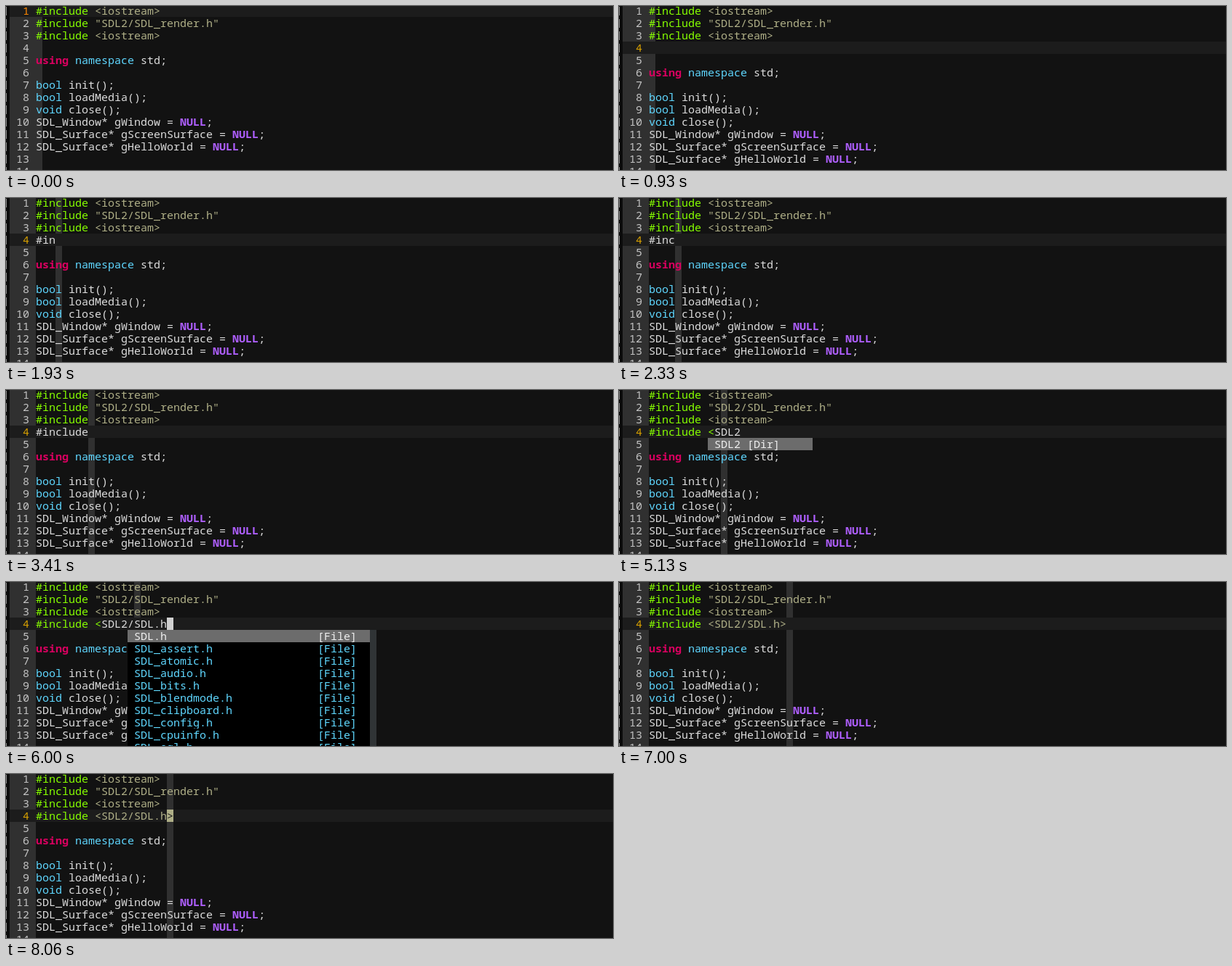
Write an HTML page with a canvas that moves like this. It is 834 px wide and 226 px high and loops after 8210 ms.

```html
<!DOCTYPE html>
<html lang="en">
<head>
<meta charset="utf-8">
<title>Editor completion</title>
<style>
  html, body { margin: 0; width: 100%; height: 100%; overflow: hidden; background: #121212; }
  canvas { display: block; }
</style>
</head>
<body>
<canvas id="screen" width="834" height="226"></canvas>
<script>
const LOOP = 8210;
const CELL = 9, LINE = 17, LEFT = 41, TOP = -2, GUTTER = 5, WIDTH = 834, ROWS = 14;
const C = {
  bg: '#121212', line: '#1c1c1c', column: '#303030', edge: '#0b0b0b', mark: '#8a8a8a',
  text: '#dcdcdc', number: '#c4c4c4', green: '#87ff00', tan: '#afaf87', cyan: '#5fd7ff',
  pink: '#d7005f', purple: '#af5fff', menu: '#000000', chosen: '#6c6c6c', bar: '#303436'
};

const ctx = document.getElementById('screen').getContext('2d');

const include = target => [['#include ', C.green], [target, C.tan]];
const declare = name => [[name + ' = ', C.text], ['NULL', C.purple, true], [';', C.text]];
const proto = (type, name) => [[type, C.cyan], [' ' + name + '();', C.text]];
const FILE = [
  include('<iostream>'),
  include('"SDL2/SDL_render.h"'),
  include('<iostream>'),
  [],
  [['using', C.pink, true], [' ', C.text], ['namespace', C.cyan], [' std;', C.text]],
  [],
  proto('bool', 'init'),
  proto('bool', 'loadMedia'),
  proto('void', 'close'),
  declare('SDL_Window* gWindow'),
  declare('SDL_Surface* gScreenSurface'),
  declare('SDL_Surface* gHelloWorld')
];

// Menus: first column, column of the kind label, width in cells, entries.
const entries = (names, kind) => names.split(' ').map(name => [name, kind]);
const headers = 'assert atomic audio bits blendmode clipboard config cpuinfo egl'
  .split(' ').map(name => `SDL_${name}.h`).join(' ');
const MENUS = {
  words: { col: 0, kind: 22, width: 29, bar: true,
    items: entries('include init inline int SDL_Window gWindow using iostream main incl', '[ID]') },
  std: { col: 9, kind: 29, width: 28, bar: true, items: [
    ['SDL2', '[Dir]'], ...entries('algorithm array atomic', '[File]'),
    ...entries('backward bits', '[Dir]'),
    ...entries('bitset cassert ccomplex cctype', '[File]')] },
  folder: { col: 9, kind: 15, width: 16, items: [['SDL2', '[Dir]']] },
  sdl: { col: 14, kind: 43, width: 37, bar: true, items: entries('SDL.h ' + headers, '[File]') }
};

// Each step overrides part of the editor state from its time on.
const STEPS = [
  [0, { row: 1, col: 0, opened: false, text: '', syntax: 'plain', menu: null, pick: -1, block: -1 }],
  [40, { row: 2 }],
  [600, { row: 3 }],
  [800, { row: 4, opened: true }],
  [1440, { text: '#' }],
  [1570, { col: 1 }],
  [1730, { text: '#i' }],
  [1830, { col: 2 }],
  [1930, { text: '#in', col: 3 }],
  [2130, { text: '#inc', menu: 'words' }],
  [2330, { col: 4, menu: null }],
  [2530, { text: '#incl', menu: 'words' }],
  [2590, { col: 5, menu: null }],
  [2660, { text: '#inclu', menu: 'words' }],
  [2720, { col: 6, menu: null }],
  [2920, { text: '#includ' }],
  [3060, { col: 7 }],
  [3260, { text: '#include' }],
  [3410, { col: 8 }],
  [3610, { text: '#include ' }],
  [3710, { col: 9 }],
  [3810, { text: '#include <' }],
  [4050, { syntax: 'open', col: 10 }],
  [4170, { menu: 'std' }],
  [4770, { text: '#include <S', col: 11, menu: null }],
  [4910, { menu: 'folder' }],
  [5130, { text: '#include <SDL2', pick: 0 }],
  [5320, { text: '#include <SDL2/', col: 15, menu: null, pick: -1 }],
  [5520, { menu: 'sdl' }],
  [6000, { text: '#include <SDL2/SDL.h', pick: 0, block: 20 }],
  [7000, { text: '#include <SDL2/SDL.h>', syntax: 'closed', col: 21, menu: null, pick: -1, block: -1 }],
  [7300, { block: 20 }],
  [7440, { block: 21 }],
  [7930, { block: 20 }],
  [8000, { col: 20 }]
];

const stateAt = time => Object.assign({}, ...STEPS.filter(([at]) => at <= time).map(step => step[1]));
const xOf = col => LEFT + col * CELL;
const yOf = row => TOP + (row - 1) * LINE;

function fill(color, x, y, w, h) {
  ctx.fillStyle = color;
  ctx.fillRect(x, y, w, h);
}

function write(text, col, row, color, bold) {
  ctx.font = `${bold ? 'bold ' : ''}15px "Noto Sans Mono", monospace`;
  ctx.fillStyle = color;
  [...text].forEach((char, i) => ctx.fillText(char, xOf(col + i), yOf(row) + 14));
}

function writeSpans(spans, row) {
  let col = 0;
  for (const [text, color, bold] of spans) {
    write(text, col, row, color, bold);
    col += text.length;
  }
}

function typedSpans({ text, syntax }) {
  if (syntax === 'plain') return [[text, C.text]];
  const split = syntax === 'open' ? 10 : 9;
  return [[text.slice(0, split), C.green], [text.slice(split), syntax === 'open' ? C.text : C.tan]];
}

function drawMenu({ col, kind, width, bar, items }, pick) {
  const x = xOf(col), w = width * CELL;
  items.forEach(([name, label], i) => {
    const row = 5 + i, color = i === pick ? '#eeeeee' : C.cyan;
    fill(i === pick ? C.chosen : C.menu, x, yOf(row), w, LINE);
    write(name, col + 1, row, color);
    write(label, kind, row, color);
    if (bar) fill(C.bar, x + w, yOf(row), CELL, LINE);
  });
}

function draw(time) {
  const s = stateAt(time);
  fill(C.bg, 0, 0, WIDTH, 226);
  fill(C.edge, 0, 0, GUTTER, 226);
  fill(C.column, GUTTER, 0, LEFT - GUTTER, 226);
  fill(C.column, xOf(s.col), 0, CELL, 226);
  fill(C.line, GUTTER, yOf(s.row), WIDTH - GUTTER, LINE);

  const lines = FILE.slice();
  if (s.opened) lines.splice(3, 0, typedSpans(s));
  for (let row = 1; row <= ROWS; row++) {
    fill(C.mark, 0, yOf(row) + 3, 1, 12);
    const current = row === s.row ? (s.opened ? '#d7a000' : '#ff8700') : C.number;
    write(String(row).padStart(3), -4, row, current);
    writeSpans(lines[row - 1] || [], row);
  }
  if (s.menu) drawMenu(MENUS[s.menu], s.pick);
  if (s.block >= 0) {
    const char = s.text[s.block] || '';
    fill(char ? C.tan : '#d0d0d0', xOf(s.block), yOf(4), CELL, LINE);
    write(char, s.block, 4, C.line);
  }
}

function tick(now) {
  draw(now % LOOP);
  requestAnimationFrame(tick);
}
draw(0);
requestAnimationFrame(tick);
</script>
</body>
</html>
```
